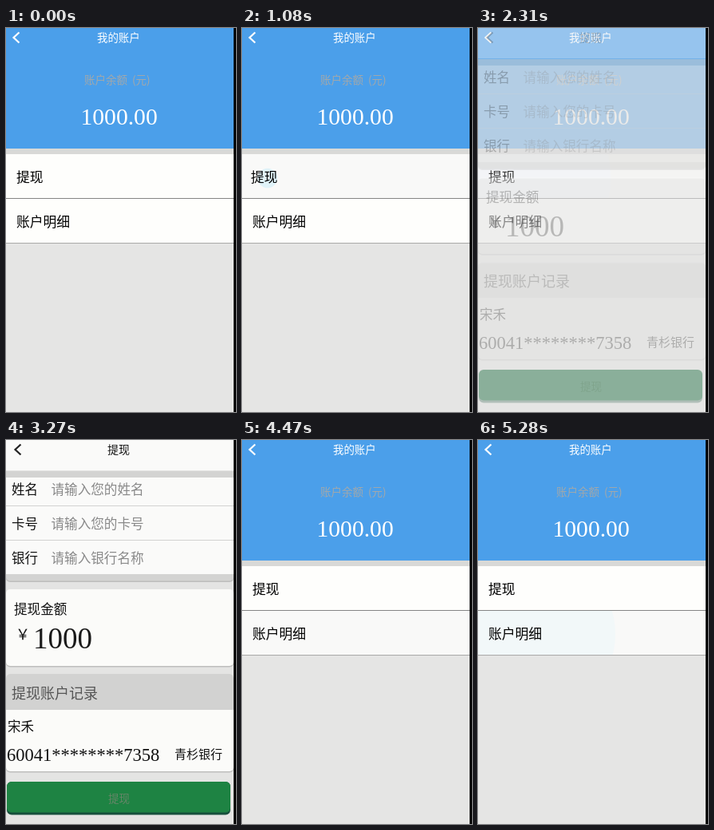
Animation of 288x481 px, one loop 5520 ms. Source, as an HTML page with a canvas:

```html
<!DOCTYPE html>
<html lang="zh-CN">
<head>
<meta charset="utf-8">
<style>
html, body { margin: 0; width: 100%; height: 100%; overflow: hidden; background: #000; }
canvas { display: block; }
</style>
</head>
<body>
<canvas id="stage" width="288" height="481"></canvas>
<script>
const ctx = document.getElementById('stage').getContext('2d');
const LOOP = 5520, WIDTH = 285, HEIGHT = 481;
const SANS = '"Noto Sans CJK SC", "Noto Sans CJK", sans-serif';
const SERIF = '"Liberation Serif", serif';

const clamp = v => Math.max(0, Math.min(1, v));
const progress = (t, from, to) => clamp((t - from) / (to - from));
const easeOut = p => 1 - (1 - p) ** 2;
const mix = (a, b, p) => `rgb(${a.map((v, i) => Math.round(v + (b[i] - v) * p))})`;

function rect(x, y, w, h, color) {
  ctx.fillStyle = color;
  ctx.fillRect(x, y, w, h);
}

function panel(x, y, w, h, radius, color) {
  ctx.fillStyle = color;
  ctx.beginPath();
  ctx.roundRect(x, y, w, h, radius);
  ctx.fill();
}

// y is the vertical middle of the characters
function label(text, x, y, size, color = '#111') {
  ctx.font = `${size}px ${SANS}`;
  ctx.fillStyle = color;
  ctx.fillText(text, x, y + size * 0.38);
}

function digits(text, x, baseline, size, color) {
  ctx.font = `${size}px ${SERIF}`;
  ctx.fillStyle = color;
  ctx.fillText(text, x, baseline);
}

function backArrow(x, color) {
  ctx.strokeStyle = color;
  ctx.lineWidth = 2.2;
  ctx.beginPath();
  ctx.moveTo(x + 7, 5.5);
  ctx.lineTo(x, 12);
  ctx.lineTo(x + 7, 18.5);
  ctx.stroke();
}

function menuRow(y, text, x, pressed, ripple) {
  rect(0, y, WIDTH, 55, pressed ? '#f9f9f8' : '#fefefc');
  if (ripple.radius > 0) {
    ctx.save();
    ctx.beginPath();
    ctx.rect(0, y, WIDTH, 55);
    ctx.clip();
    ctx.fillStyle = ripple.color;
    ctx.beginPath();
    ctx.arc(ripple.x, ripple.y, ripple.radius, 0, Math.PI * 2);
    ctx.fill();
    ctx.restore();
  }
  label(text, x, y + 28.5, 16.8, '#000');
}

function accountPage(t) {
  rect(0, 0, WIDTH, HEIGHT, '#e5e5e4');
  rect(0, 0, WIDTH, 151, '#4b9fea');
  rect(0, 151, WIDTH, 7, '#d9d9d7');
  backArrow(9.5, '#fff');
  label('我的账户', 114, 12, 13.4, '#fff');
  label('账户余额', 98, 65, 13.5, '#a2a8ab');
  label('(元)', 158, 65, 13.5, '#a2a8ab');
  digits('1000.00', 93.5, 121, 29.6, '#fff');

  const firstRipple = {
    x: 32, y: 188,
    radius: t < 1050 || t >= 2430 ? 0 : 11 + 123 * progress(t, 1080, 1170),
    color: mix([224, 243, 249], [248, 249, 253], progress(t, 1080, 1590))
  };
  const secondRipple = {
    x: 70, y: 243,
    radius: 102 * easeOut(progress(t, 4470, 5040)),
    color: mix([224, 243, 249], [242, 248, 249], progress(t, 4470, 5010))
  };
  const nudged = t >= 1050 && t < 1230;
  menuRow(158, '提现', nudged ? 11 : 13, t >= 660 && t < 2430, firstRipple);
  menuRow(214, '账户明细', 13, t >= 4080, secondRipple);
  rect(0, 213, WIDTH, 1, '#858585');
  rect(0, 269, WIDTH, 1, '#a9a9a8');
}

function card(y, h) {
  panel(0, y + 1.5, WIDTH, h, 5, '#bebebd');
  panel(0, y, WIDTH, h, 5, '#fbfbf9');
}

function withdrawPage() {
  rect(0, 0, WIDTH, HEIGHT, '#e4e4e3');
  rect(0, 0, WIDTH, 38, '#fafaf9');
  backArrow(11.5, '#222');
  label('提现', 127, 12, 14);

  panel(0, 39, WIDTH, 139, [0, 0, 5, 5], '#bdbdbc');
  panel(0, 39, WIDTH, 137.5, [0, 0, 5, 5], '#d3d3d2');
  rect(0, 47, WIDTH, 121, '#fafaf9');
  [['姓名', '请输入您的姓名'], ['卡号', '请输入您的卡号'], ['银行', '请输入银行名称']]
    .forEach(([name, hint], i) => {
      const y = 61.5 + i * 43;
      label(name, 7, y, 16.5);
      label(hint, 56.5, y, 16.6, '#898989');
      if (i < 2) rect(0, 82 + i * 43, WIDTH, 1, '#d2d2d1');
    });

  card(187, 96);
  label('提现金额', 10, 211.5, 16.6);
  label('￥', 12, 243, 18);
  digits('1000', 34, 261, 37, '#1a1a1a');

  card(293, 122);
  panel(0, 293, WIDTH, 45, [5, 5, 0, 0], '#d2d2d1');
  label('提现账户记录', 7, 317, 18, '#555');
  label('宋禾', 2, 358.5, 16.5);
  digits('60041********7358', 1, 402, 22.5, '#111');
  label('青杉银行', 211, 393.5, 15);

  panel(1, 428, 280, 41.5, 6, '#174f3c');
  panel(1, 428, 280, 38.5, 6, '#1e8343');
  label('提现', 128, 448.5, 13.5, '#668668');
}

function draw(now) {
  const t = now % LOOP;
  const fade = t < 3780 ? progress(t, 2280, 2400) : 0;
  const shown = t < 2310 ? 0 : fade;
  if (shown < 1) accountPage(t);
  if (shown > 0) {
    ctx.globalAlpha = shown;
    withdrawPage();
    ctx.globalAlpha = 1;
  }
  rect(WIDTH, 0, 3, HEIGHT, '#000');
}

const start = performance.now();
function tick() {
  draw(performance.now() - start);
  requestAnimationFrame(tick);
}
tick();
</script>
</body>
</html>
```
